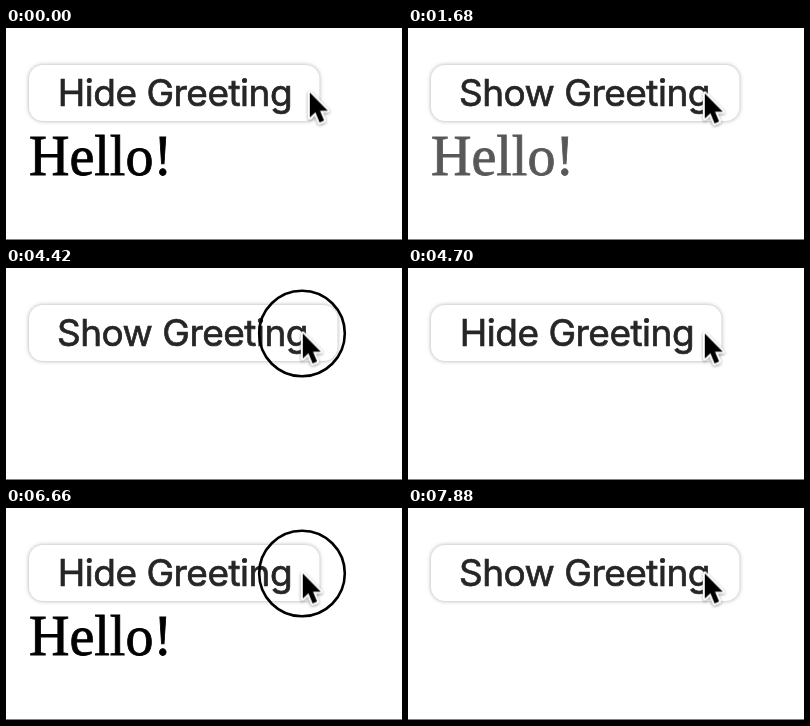
Write an HTML page that moves like this. It is 396 px wide and 212 px high and loops after 8000 ms.

```html
<!DOCTYPE html>
<html lang="en">
<head>
<meta charset="utf-8">
<title>Greeting toggle</title>
<style>
  html, body { margin: 0; width: 100%; height: 100%; overflow: hidden; background: #fff; }
  svg { display: block; width: 396px; height: 212px; }
  .label { font: 37px Inter, Roboto, sans-serif; letter-spacing: -0.5px; fill: #262626; stroke: #262626; stroke-width: 0.7; text-anchor: middle; }
  .hello { font: 56px "Liberation Serif", "Times New Roman", serif; stroke: #000; stroke-width: 0.8; animation: fade 8s infinite; }
  .box { fill: #fff; filter: drop-shadow(0 0.5px 2px #0005); }
  .ring { fill: none; stroke: #000; stroke-width: 2.6; animation: press 8s step-end infinite; }
  .hide { animation: hide 8s step-end infinite; }
  .show { animation: show 8s step-end infinite; }
  .cursor { animation: move 8s linear infinite; filter: drop-shadow(0 1px 1.5px #0006); }
  .arrow { fill: #000; stroke: #fff; stroke-width: 4; stroke-linejoin: round; paint-order: stroke; }

  @keyframes move {
    0%, 7% { transform: translate(303.8px, 64.5px); }
    8.25%, 100% { transform: translate(296.8px, 65.5px); }
  }
  /* The greeting eases for half a second after each release. */
  @keyframes fade {
    0%, 19.625% { opacity: 1; animation-timing-function: ease; }
    25.875%, 58.75% { opacity: 0; animation-timing-function: ease; }
    65%, 85.25% { opacity: 1; animation-timing-function: ease; }
    91.5%, 100% { opacity: 0; }
  }
  @keyframes press {
    0%, 19.625%, 58.75%, 85.25%, 100% { opacity: 0; }
    16.5%, 55.25%, 83.25% { opacity: 1; }
  }
  @keyframes hide {
    0%, 58.75% { opacity: 1; }
    19.625%, 85.25%, 100% { opacity: 0; }
  }
  @keyframes show {
    0%, 58.75% { opacity: 0; }
    19.625%, 85.25%, 100% { opacity: 1; }
  }
</style>
</head>
<body>
<svg viewBox="0 0 396 212">
  <g class="hide">
    <rect class="box" x="23" y="37" width="290.5" height="56" rx="14"/>
    <text class="label" x="169" y="77.7">Hide Greeting</text>
  </g>
  <g class="show">
    <rect class="box" x="23" y="37" width="308.5" height="56" rx="14"/>
    <text class="label" x="176.5" y="77.7">Show Greeting</text>
  </g>
  <text class="hello" x="23" y="147.3">Hello!</text>
  <rect y="211" width="396" height="1" fill="#808080"/>
  <circle class="ring" cx="296" cy="65.5" r="42.8"/>
  <g class="cursor">
    <path class="arrow" d="M0 0V25L5.6 19.8L9.8 30L14.3 28.1L10.2 18.3H18Z"/>
  </g>
</svg>
</body>
</html>
```
